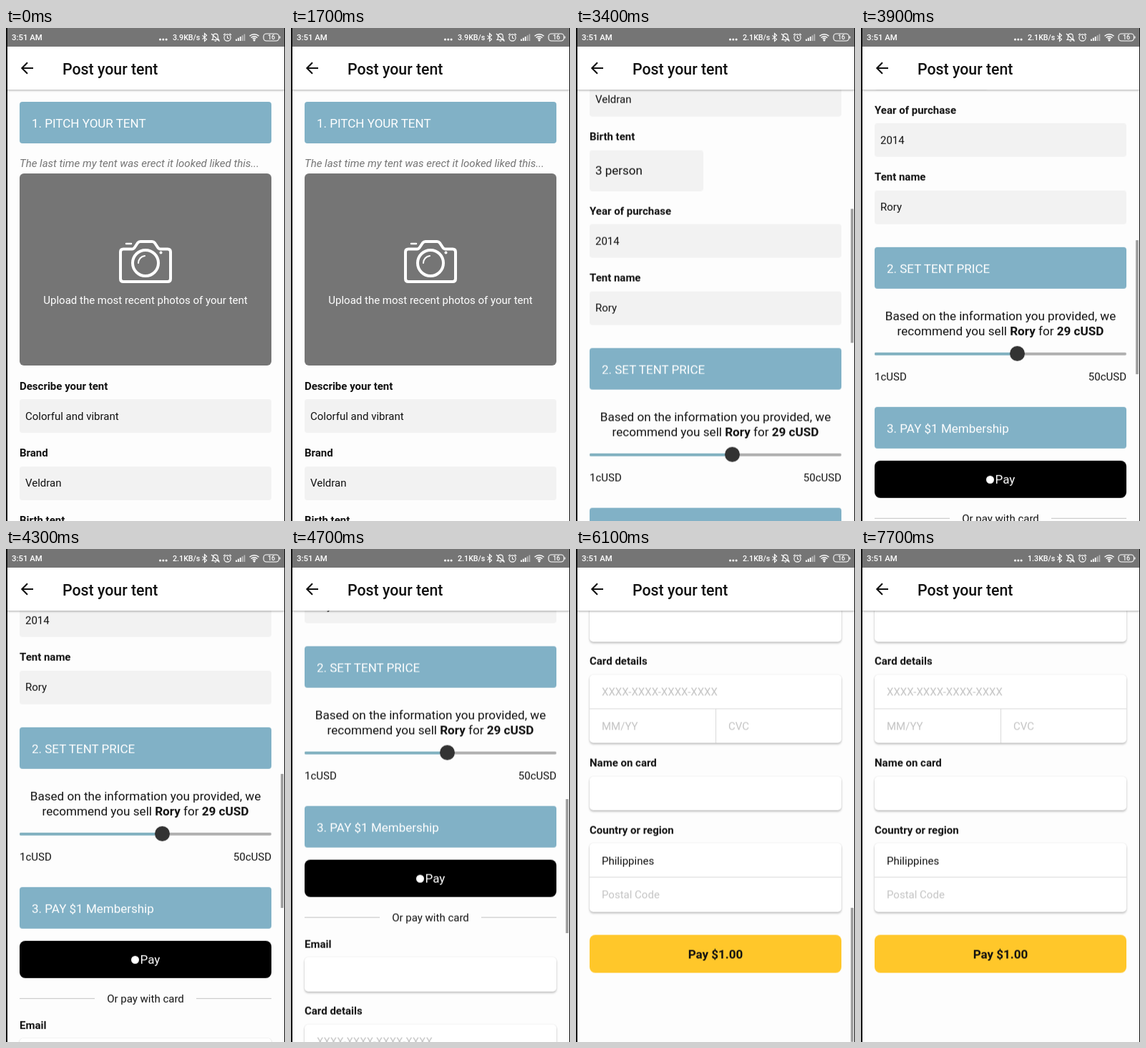
Recreate the animation shown at these times as an HTML page. Size 390x688 px, loop 8 s.

```html
<!DOCTYPE html>
<html lang="en">
<head>
<meta charset="utf-8">
<title>Post your tent</title>
<style>
html, body { margin: 0; width: 100%; height: 100%; overflow: hidden; background: #fdfdfd; }
#stage { position: relative; width: 390px; height: 688px; overflow: hidden; background: #fdfdfd; font: 15px/20px Roboto, sans-serif; color: #111; }
#page, #page > *, .bar, .edge, #thumb, #icons { position: absolute; }
#page { left: 0; top: 0; width: 390px; height: 2023px; will-change: transform; }
.t { white-space: pre; }
.mid { left: 0; width: 390px; text-align: center; }
.b, b { font-weight: 700; }
.big { font-size: 17px; }
.info { font-size: 17.1px; }
.white { color: #fff; }
.hint { color: #c4c4c4; }
.note { font-style: italic; color: #757575; }
.step { background: #81b1c6; border-radius: 4px; }
.photo { background: #757575; border-radius: 6px; }
.field { background: #f2f2f2; border-radius: 4px; }
.card { background: #fff; border-radius: 5px; box-shadow: 0 2px 3px rgba(0,0,0,.24), 0 0 2px rgba(0,0,0,.12); }
.line { background: #d9d9d9; }
.rule { background: #c2c2c2; }
.done { background: #81b1c0; border-radius: 2px; }
.rest { background: #b0b0b0; border-radius: 2px; }
.knob { background: #333; border-radius: 50%; }
.dot { background: #fff; border-radius: 50%; }
.pay { background: #000; border-radius: 8px; }
.buy { background: #ffc72a; border-radius: 8px; }
.bar { left: 0; width: 390px; }
#head { top: 26px; height: 60px; background: #fff; box-shadow: 0 1px 3px rgba(0,0,0,.32); }
#status { top: 0; height: 26px; background: #757575; }
#thumb { left: 384px; top: 86px; width: 4px; height: 187px; background: #a3a3a3; }
#icons { left: 0; top: 0; }
.edge { top: 0; width: 1.5px; height: 688px; background: #111; }
</style>
</head>
<body>
<div id="stage">
  <div id="page"></div>
  <div id="thumb"></div>
  <div id="head" class="bar"></div>
  <div id="status" class="bar"></div>
  <svg id="icons" width="390" height="88" fill="none" stroke="#fff" stroke-width="1.1" font-family="Roboto, sans-serif" font-weight="500">
    <g fill="#fff" stroke="none">
      <text x="8" y="17.2" font-size="11.4">3:51 AM</text>
      <text id="speed" x="233" y="17" font-size="10.7">3.9KB/s</text>
      <circle cx="215.5" cy="16" r="1.5"/><circle cx="219.8" cy="16" r="1.5"/><circle cx="224.1" cy="16" r="1.5"/>
      <path d="M321 18v-2.5h1.8V18zM323.9 18v-4.300h1.800V18zM326.800 18v-6h1.800v6z"/>
      <path d="M329.700 18v-7.700h1.800V18zM332.600 18V8.500h1.600V18z" opacity=".5"/>
      <circle cx="347" cy="17" r="1.5"/>
      <text x="371" y="16.200" font-size="9" text-anchor="middle">16</text>
    </g>
    <path d="M274.500 10.300l6 5.400-3 2.800V7.500l3 2.800-6 5.400"/>
    <path d="M288 16.500h9.500l-1.300-1.800v-3.200a3.400 3.400 0 0 0-6.800 0v3.200zM291.500 18.300h2.500M287 8l11.500 10.500"/>
    <circle cx="309.500" cy="13.500" r="4.600"/>
    <path d="M309.500 10.800v3l2 1M304 9.800l2.500-2M315 9.800l-2.500-2"/>
    <path d="M340.500 11.300a9.500 9.500 0 0 1 13 0M342.600 13.400a6.500 6.500 0 0 1 8.800 0M344.700 15.300a3.500 3.500 0 0 1 4.600 0" stroke-width="1.400"/>
    <rect x="360" y="8" width="21.500" height="10" rx="4"/>
    <path d="M383 11.500v3"/>
    <path d="M38 56H22.500M30 48.300L22.300 56l7.700 7.700" stroke="#111" stroke-width="2.100"/>
    <text x="79" y="64.500" font-size="21.300" fill="#111" stroke="none">Post your tent</text>
  </svg>
  <div class="edge" style="left:0"></div>
  <div class="edge" style="right:0"></div>
</div>
<script>
const $ = id => document.getElementById(id);
const page = $('page'), thumb = $('thumb'), speed = $('speed');

function add(cls, css, html = '') {
  const el = document.createElement('div');
  el.className = cls;
  for (const k in css) el.style[k] = css[k] + 'px';
  el.innerHTML = html;
  page.append(el);
}
const box = (cls, left, top, width, height) => add(cls, { left, top, width, height });
// y is the vertical centre of the line
const text = (x, y, html, cls = '') => add('t ' + cls, { left: x, top: y - 10 }, html);
const centred = (y, html, cls = '') => add('t mid ' + cls, { top: y - 10 }, html);

function step(y, label) {
  box('step', 19, y, 352, 57.5);
  text(36, y + 29.5, label, 'big white');
}
function field(y, label, value, w = 352, h = 47, cls = '') {
  text(19, y, label, 'b');
  box('field', 19, y + 18.5, w, h);
  text(27, y + 18.5 + h / 2, value, cls);
}
function card(y, label, h) {
  text(19, y, label, 'b');
  box('card', 19, y + 18.5, 352, h);
}

step(103, '1. PITCH YOUR TENT');
text(19, 189, 'The last time my tent was erect it looked liked this...', 'note');
box('photo', 19, 203, 352, 268);
add('', { left: 155, top: 292 }, `<svg width="80" height="67" fill="none" stroke="#fff" stroke-width="4" stroke-linejoin="round" stroke-linecap="round">
  <path d="M9 16.500h12q2.500 0 4-2.500l4-6q1.500-2 4-2h16q2.500 0 4 2l4 6q1.500 2.500 4 2.500h10q4 0 4 4V58q0 4-4 4H9q-4 0-4-4V20.500q0-4 4-4z"/>
  <circle cx="40" cy="36" r="18"/>
  <path d="M30 36a10 10 0 0 1 9-10" stroke-width="2"/>
  <path d="M13 9h7" stroke-width="2.500"/>
  <circle cx="61.500" cy="21.500" r="2" fill="#fff" stroke="none"/></svg>`);
centred(380, 'Upload the most recent photos of your tent', 'white');

field(499.5, 'Describe your tent', 'Colorful and vibrant');
field(593, 'Brand', 'Veldran');
field(687, 'Birth tent', '3 person', 159, 57, 'big');
field(790.5, 'Year of purchase', '2014');
field(884, 'Tent name', 'Rory');

step(982, '2. SET TENT PRICE');
centred(1077.5, 'Based on the information you provided, we', 'info');
centred(1098.5, 'recommend you sell <b>Rory</b> for <b>29 cUSD</b>', 'info');
box('rest', 19, 1128.5, 352, 4);
box('done', 19, 1128.5, 200, 4);
box('knob', 208, 1120, 21, 21);
text(19, 1163, '1cUSD');
add('t', { right: 19, top: 1153 }, '50cUSD');

step(1205, '3. PAY $1 Membership');
box('pay', 19, 1280, 352, 52);
box('dot', 175, 1300.5, 11, 11);
text(187.5, 1306, 'Pay', 'big white');
box('rule', 19, 1359.5, 105, 1);
centred(1360.5, 'Or pay with card');
box('rule', 266, 1359.5, 105, 1);

card(1397.5, 'Email', 47.5);
card(1491, 'Card details', 95.5);
text(36, 1533.5, 'XXXX-XXXX-XXXX-XXXX', 'hint');
box('line', 19, 1556.5, 352, 1);
box('line', 195, 1557, 1, 48);
text(36, 1581.5, 'MM/YY', 'hint');
text(213, 1581.5, 'CVC', 'hint');
card(1633, 'Name on card', 47);
card(1726.5, 'Country or region', 95.5);
text(36, 1769.5, 'Philippines');
box('line', 19, 1792, 352, 1);
text(36, 1817, 'Postal Code', 'hint');
box('buy', 19, 1873, 352, 52.5);
centred(1900, 'Pay $1.00', 'big b');

// [ms, scroll offset]
const path = [[1950, 0], [2300, 34], [2600, 83], [3000, 300], [3400, 535], [3900, 676], [4300, 733],
  [4700, 846], [5100, 1120], [5500, 1275], [6000, 1334.5]];
const last = path.length - 1;
const grade = i => (path[i + 1][1] - path[i][1]) / (path[i + 1][0] - path[i][0]);
const slope = path.map((_, i) => {
  if (i === 0 || i === last) return 0;
  const a = grade(i - 1), b = grade(i);
  return 2 * a * b / (a + b);
});

function scrollAt(t) {
  if (t <= path[0][0]) return 0;
  if (t >= path[last][0]) return path[last][1];
  const i = path.findIndex(p => p[0] > t) - 1;
  const [t0, y0] = path[i], [t1, y1] = path[i + 1];
  const d = t1 - t0, u = (t - t0) / d, v = 1 - u;
  return v * v * ((1 + 2 * u) * y0 + u * d * slope[i]) + u * u * ((1 + 2 * v) * y1 - v * d * slope[i + 1]);
}

const LOOP = 8000, start = performance.now();
function draw() {
  const t = (performance.now() - start) % LOOP;
  const y = scrollAt(t);
  page.style.transform = `translateY(${-y}px)`;
  thumb.style.transform = `translateY(${y * 0.3108}px)`;
  thumb.style.opacity = t < 1950 ? 0 : Math.min(1, Math.max(0, (6500 - t) / 250));
  speed.textContent = (t < 3000 ? '3.9' : t < 7000 ? '2.1' : '1.3') + 'KB/s';
  requestAnimationFrame(draw);
}
draw();
</script>
</body>
</html>
```
